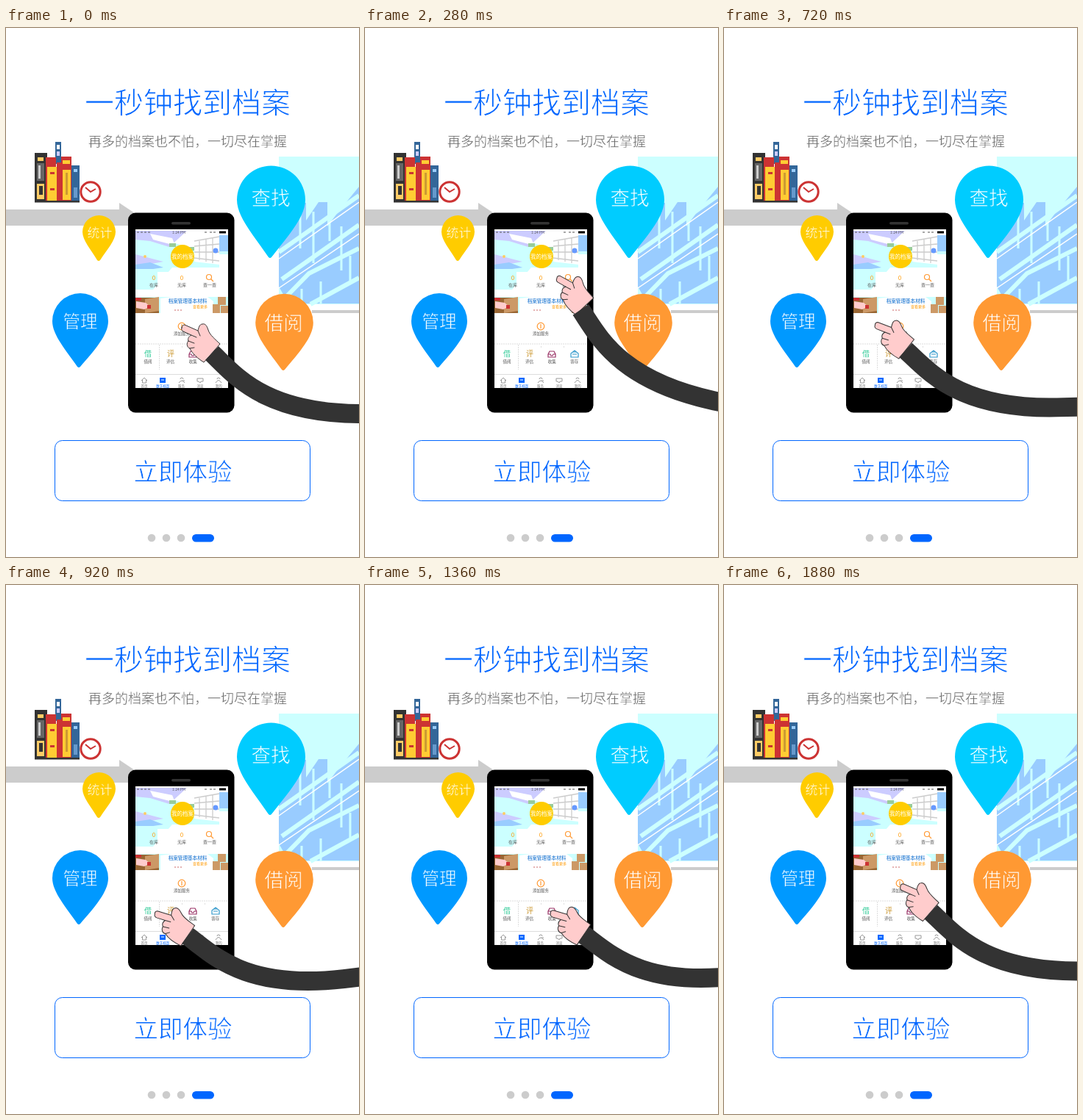
Recreate the animation shown at these times as an HTML page. Size 480 by 720 pixels, loop 1.92 s.

```html
<!DOCTYPE html>
<html lang="zh">
<head>
<meta charset="utf-8">
<style>
html, body { margin: 0; width: 100%; height: 100%; overflow: hidden; background: #fff; }
svg { display: block; width: 480px; height: 720px; font-family: "Noto Sans CJK SC", "Noto Sans CJK", sans-serif; font-weight: 300; }
text { text-anchor: middle; }
/* a stroke in the background colour makes the letters lighter */
.thin { stroke: #fff; stroke-width: 1; }
</style>
</head>
<body>
<svg viewBox="0 0 480 720">
  <text class="thin" x="247" y="115.5" font-size="40" fill="#06f">一秒钟找到档案</text>
  <text class="thin" x="247" y="161" font-size="18" fill="#666" style="stroke-width:.4">再多的档案也不怕，一切尽在掌握</text>

  <!-- building picture -->
  <path fill="#cff" d="M371 175H480V376H371Z"/>
  <path fill="#9cf" d="M384 238H408V262L425 237H437V270L452 250L480 216V375H384L371 352V290L384 268Z"/>
  <g stroke="#cff" fill="none" stroke-width="6">
    <path d="M371 305L480 228M375 342L480 268M371 376L412 334L480 300M414 376L480 340"/>
    <path stroke-width="3" d="M400 238V300M418 250V320M440 250V290M456 270V330M428 345V375M402 355V376M468 310V345"/>
  </g>
  <path d="M371 314L480 237M371 354L480 280" stroke="#fff" stroke-width="1.5"/>
  <path d="M416 386H480" stroke="#ccc" stroke-width="4"/>

  <path fill="#ccc" d="M0 247H154V238L181 256L166 269H0Z"/>

  <!-- books and clock -->
  <g id="books"></g>
  <circle cx="115" cy="223" r="13.2" fill="#fff" stroke="#c33" stroke-width="3"/>
  <path d="M108 217L115 223L122 219" fill="none" stroke="#c33" stroke-width="2"/>

  <g id="pins" fill="#fff"></g>

  <!-- phone -->
  <rect x="166" y="251.5" width="144.500" height="272" rx="10"/>
  <rect x="225" y="264" width="26" height="3.5" rx="1.7" fill="#333"/>
  <path fill="#fff" d="M176 274H302V490H176Z"/>
  <g id="header">
    <path fill="#cff" d="M176 282L222 290L256 302H302V326H226L200 356H176Z"/>
    <path fill="#ccf" d="M176 276H246L222 298L196 290L176 288ZM176 308L214 318L192 322H176Z"/>
    <path fill="#fff" d="M196 280L226 286L230 296L200 288ZM256 288L290 281V322L256 318Z"/>
    <path fill="none" stroke="#ccc" stroke-width="1.3" d="M256 290L290 284M256 297L290 294M256 305H290M256 313L290 317M263 290V316M272 288V318M281 286V320"/>
    <path fill="#9cf" d="M176 322L196 319L214 326L200 328H176ZM290 282H302V304H290Z"/>
    <path fill="#fff" d="M290 308H302V326H290ZM206 332H302V361H206Z"/>
    <path fill="#9c9" d="M222 293H231V298H222ZM248 298H256V303H248Z"/>
    <circle cx="285" cy="303" r="3.5" fill="#69f"/>
    <circle cx="189" cy="311" r="2" fill="#fc6"/>
    <circle cx="240" cy="311" r="16" fill="#fc0"/>
    <path d="M178 278H196M270 278H274M277 278H286" stroke="#555" stroke-dasharray="3 2"/>
    <path d="M290 278H299" stroke="#000" stroke-width="3"/>
  </g>
  <path fill="#cff" d="M176 366H302V388H176Z"/>
  <path fill="#fff" d="M210 368L226 366H274L282 372V388H210Z"/>
  <path fill="#963" d="M176 367H208V388H176Z"/>
  <path fill="#c96" d="M189 369L208 366V385L189 388ZM281 376H291V388H281ZM288 366H299V377H288ZM292 378H302V388H292Z"/>
  <path fill="#fcc" d="M177 372L190 374L196 379L188 383L177 381Z"/>
  <path fill="#c33" d="M176 367H184V371H176ZM192 377H197V382H192Z"/>
  <path d="M229 384H241" stroke="#c66" stroke-dasharray="2 2"/>
  <g fill="none" stroke="#f93" stroke-width="1.2">
    <circle cx="239" cy="406" r="4.8"/><path d="M239 403V409"/>
    <circle cx="276" cy="339" r="3.5"/><path d="M278.500 341.500L282 345"/>
  </g>
  <path d="M208.500 431V465M239.500 433V436M270.500 433V436M176 430H302" stroke="#ddd" stroke-dasharray="2 1"/>
  <path d="M176 471.500H302" stroke="#ddd"/>
  <path d="M249 444L251 440H257L259 444V448H249ZM249 444H252L253 446H255L256 444H259" fill="none" stroke="#936" stroke-width="1.200"/>
  <path d="M280 443L285 439L290 443V448H280ZM282 441H288M282 444H288" fill="none" stroke="#39c" stroke-width="1.200"/>
  <g fill="none" stroke="#999">
    <path d="M184 480L188 476L192 480M185.500 479V483H190.500V479"/>
    <path d="M235 483Q239 477 243 483M237 478a2 2 0 1 1 4 0M240 480h3"/>
    <path d="M260 477H268V481H265L264 483L262 481H260Z"/>
    <path d="M285 483Q289 476 293 483M287 478a2 2 0 1 1 4 0"/>
  </g>
  <path fill="#06f" d="M209 476H217V483H209Z"/><path d="M211 479H215" stroke="#fff"/>
  <g id="labels"></g>

  <rect x="66.500" y="561.500" width="347" height="82" rx="10" fill="#fff" stroke="#06f"/>
  <text class="thin" x="240.500" y="616" font-size="33.500" fill="#06f" style="stroke-width:.8">立即体验</text>
  <g fill="#ccc"><circle cx="198" cy="694" r="5.300"/><circle cx="218" cy="694" r="5.300"/><circle cx="238" cy="694" r="5.300"/></g>
  <rect x="253" y="689" width="30" height="10.500" rx="5.250" fill="#06f"/>

  <!-- pointing hand and sleeve, both drawn around the fingertip -->
  <g id="hand" stroke="#333" stroke-width="1" stroke-linejoin="round" stroke-linecap="round">
    <path fill="#fcc" d="M0 2C0-1 2-2 4-2L22 6C23 2 24-3 28-3C32-4 34-1 36 5C38 12 46 18 52 24L30 49C22 44 14 37 11 30C7 29 6 23 9 20C8 17 9 14 13 12L2 7C0 6-1 4 0 2Z"/>
    <path fill="none" d="M13 12L20 15M9 20L17 23M11 30L17 29M22 6L25 13"/>
  </g>
  <path id="arm" fill="none" stroke="#333" stroke-width="26" d="M41 36.500C72 66 111 119 245 119H340"/>
</svg>
<script>
const $ = id => document.getElementById(id);
const label = (x, y, size, color, str, weight = 300, extra = '') =>
  `<text x="${x}" y="${y}" font-size="${size}" fill="${color}" font-weight="${weight}" ${extra}>${str}</text>`;
const box = (x, y, w, h, color) => `<rect x="${x}" y="${y}" width="${w}" height="${h}" fill="${color}"/>`;

$('books').innerHTML = [
  [39, 170, 17, 67, '#333'], [43, 176, 8, 5, '#fc6'], [42, 184, 10, 24, '#666'], [44, 187, 3, 18, '#ccc'],
  [42, 212, 10, 21, '#fc6'], [45, 215, 5, 12, '#333'],
  [67, 155, 8, 30, '#369'], [69, 159, 4, 6, '#fff'], [69, 168, 4, 6, '#ccf'],
  [54, 176, 14, 61, '#c33'], [56, 189, 13, 47, '#fc3'], [60, 196, 6, 3, '#c33'], [60, 218, 6, 3, '#c33'],
  [69, 183, 6, 54, '#c33'],
  [75, 175, 14, 62, '#c33'], [77, 180, 10, 5, '#fc3'], [77, 193, 11, 41, '#fc3'], [81, 197, 3, 30, '#c93'],
  [89, 187, 11, 50, '#369'], [92, 192, 5, 4, '#9cf'], [92, 217, 5, 14, '#69c'],
  [39, 235, 61, 2.5, '#333']
].map(b => box(...b)).join('');

function pin(x, y, r, tipX, tipY, color, str, size, textX, textY) {
  const low = y + r * 0.5, waist = y + r * 1.05;
  return `<path fill="${color}" d="M${x - r} ${y}A${r} ${r} 0 0 1 ${x + r} ${y}
    C${x + r} ${low} ${x + r * 0.5} ${waist} ${tipX + 2} ${tipY - 1}Q${tipX} ${tipY + 1} ${tipX - 2} ${tipY - 1}
    C${x - r * 0.5} ${waist} ${x - r} ${low} ${x - r} ${y}Z"/>` +
    label(textX, textY, size, '#fff', str, 300, `stroke="${color}" stroke-width="${size * 0.025}"`);
}
$('pins').innerHTML =
  pin(126.5, 277.5, 22.5, 126, 317, '#fc0', '统计', 17, 127.5, 285) +
  pin(101, 399, 38, 99, 462, '#09f', '管理', 23.5, 101, 408) +
  pin(360.5, 234, 46.5, 359, 313, '#0cf', '查找', 26.5, 360, 241) +
  pin(378.5, 401, 39.3, 377, 466, '#f93', '借阅', 26, 377.5, 411);

$('labels').innerHTML = [
  [240, 314, 7.5, '#fff', '我的档案', 400], [235, 280, 5, '#555', '1:24 PM', 400],
  [201, 343, 8, '#f90', '0'], [239, 343, 8, '#f90', '0'],
  [201, 352, 6, '#555', '在库'], [239, 352, 6, '#555', '无库'], [277, 352, 6, '#555', '查一查'],
  [247, 374, 6.6, '#06c', '档案管理基本材料', 400], [264, 381, 5, '#f90', '查看更多'],
  [239, 418, 5.5, '#555', '添加服务'],
  [193, 447, 10, '#3c9', '借', 500], [224, 447, 10, '#c93', '评', 500],
  ...['借阅', '评估', '收集', '寄存'].map((s, i) => [193 + i * 30.6, 456, 5.5, '#555', s]),
  ...['首页', '数字档案', '服务', '消息', '我的'].map((s, i) => [188 + i * 25.3, 489, 4.5, i == 1 ? '#06f' : '#777', s])
].map(l => label(...l)).join('');

// time, fingertip x and y, hand angle, arm angle
const poses = [
  [0, 239, 406, 0, 0],
  [280, 261, 339, 5, 12.3],
  [560, 213.5, 359.5, 1, 4],
  [880, 197, 446, -7, -6.5],
  [1320, 253, 448, -8, -8],
  [1920, 239, 406, 0, 0]
];

function draw(t) {
  const i = poses.findIndex(p => p[0] > t), a = poses[i - 1], b = poses[i];
  const k = (t - a[0]) / (b[0] - a[0]);
  const [, x, y, handAngle, armAngle] = a.map((v, n) => v + (b[n] - v) * k);
  $('hand').setAttribute('transform', `translate(${x} ${y}) rotate(${handAngle})`);
  $('arm').setAttribute('transform', `translate(${x} ${y}) rotate(${armAngle})`);
}

const start = performance.now();
function tick() {
  const t = (performance.now() - start) % 1920;
  draw(Math.floor(t / 40) * 40);
  requestAnimationFrame(tick);
}
tick();
</script>
</body>
</html>
```
